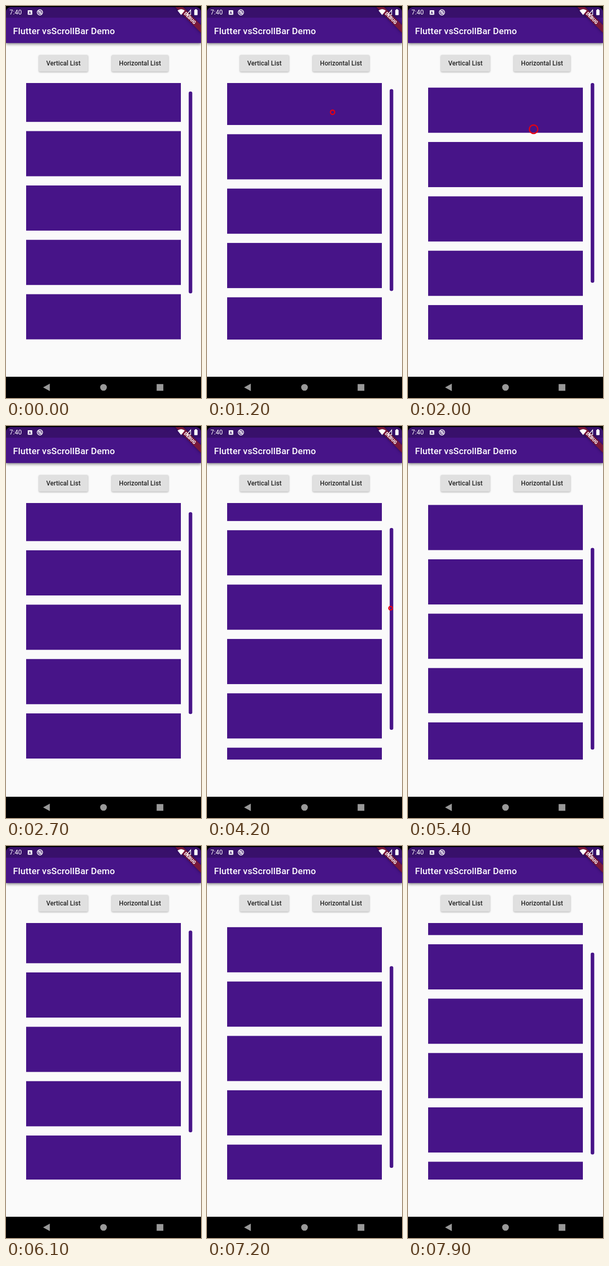
An HTML page with a canvas that plays this animation: 368 by 738 pixels, repeating every 8 s.

```html
<!DOCTYPE html>
<html lang="en">
<head>
<meta charset="utf-8">
<title>Scroll bar demo</title>
<style>
html, body { margin: 0; width: 100%; height: 100%; overflow: hidden; background: #000; }
canvas { display: block; width: 368px; height: 738px; }
</style>
</head>
<body>
<canvas id="stage"></canvas>
<script>
const W = 368, H = 738, LOOP = 8000, STEP = 100;
const PURPLE = '#471488', STATUS = '#38106b';
const LIST = { x: 38, y: 145, w: 292, h: 483, pitch: 102.35, item: 85, count: 6 };
const TRACK = LIST.h / (LIST.pitch * LIST.count);

// [time, scroll offset]; negative offsets squeeze the thumb
const SCROLL = [
  [0, 20.5], [1000, 20.5], [1700, 0], [1900, -4], [2100, -4], [2200, 0], [2500, 0],
  [2700, 22], [2900, 46], [3100, 56], [3300, 59.8], [4200, 59.8], [4700, 105],
  [5200, 118], [5300, 118], [5400, 107.4], [5500, 107.4], [6100, 18], [6400, 7.6],
  [6500, 5], [6600, 5], [6700, 80], [6800, 115], [6900, 115], [7000, 118],
  [7200, 103.2], [7600, 50.6], [7700, 50.6], [7800, 62], [7900, 71]
];
// Touch rings shrink on press and grow on release
const TOUCHES = [
  { from: 900, to: 1200, x: 237, y: 200, r0: 12, r1: 4 },
  { from: 1800, to: 2200, x: 237, y: 232, r0: 8, r1: 8 },
  { from: 2300, to: 2400, x: 237, y: 300, r0: 12, r1: 4 },
  { from: 3900, to: 4200, x: 346.5, y: 343, r0: 12, r1: 3.4 },
  { from: 4700, to: 4800, x: 346.5, y: 380, r0: 8, r1: 11 },
  { from: 7800, to: 7800, x: 346.5, y: 385, r0: 8, r1: 8 }
];

const canvas = document.getElementById('stage');
const c = canvas.getContext('2d');
const dpr = window.devicePixelRatio || 1;
canvas.width = W * dpr;
canvas.height = H * dpr;

function rect(x, y, w, h, color) {
  c.fillStyle = color;
  c.fillRect(x, y, w, h);
}

function round(x, y, w, h, r, color) {
  c.fillStyle = color;
  c.beginPath();
  c.roundRect(x, y, w, h, r);
  c.fill();
}

function poly(points, color) {
  c.fillStyle = color;
  c.beginPath();
  points.forEach(([x, y]) => c.lineTo(x, y));
  c.closePath();
  c.fill();
}

function ring(x, y, r, width, color) {
  c.strokeStyle = color;
  c.lineWidth = width;
  c.beginPath();
  c.arc(x, y, r, 0, Math.PI * 2);
  c.stroke();
}

function text(str, x, y, size, weight, color, align = 'left', spacing = 0) {
  c.font = `${weight} ${size}px Roboto, sans-serif`;
  c.letterSpacing = spacing + 'px';
  c.textAlign = align;
  c.fillStyle = color;
  c.fillText(str, x, y);
}

function withShadow(color, blur, dy, draw) {
  c.save();
  c.shadowColor = color;
  c.shadowBlur = blur * dpr;
  c.shadowOffsetY = dy * dpr;
  draw();
  c.restore();
}

function scrollAt(t) {
  const i = SCROLL.findIndex(k => k[0] > t);
  if (i < 0) return SCROLL[SCROLL.length - 1][1];
  const [t0, s0] = SCROLL[i - 1], [t1, s1] = SCROLL[i];
  return s0 + (s1 - s0) * (t - t0) / (t1 - t0);
}

function button(label, x, w) {
  withShadow('rgba(0,0,0,.3)', 3, 1, () => round(x, 92.3, w, 31.2, 2, '#e0e0e0'));
  text(label, x + w / 2, 112, 11.95, 500, '#212121', 'center', 0.08);
}

function banner() {
  c.save();
  c.beginPath();
  c.rect(300, 2, 68, 60);
  c.clip();
  c.translate(W, 2);
  c.rotate(Math.PI / 4);
  withShadow('rgba(0,0,0,.5)', 5, 0, () => rect(-35, 24, 70, 10.3, '#78183b'));
  text('DEBUG', 0, 32.2, 8.7, 900, '#fff', 'center');
  c.restore();
}

function statusIcons() {
  text('7:40', 6.5, 16.3, 12, 400, '#fff');
  round(41, 8, 8.5, 8.5, 1, '#fff');
  text('A', 45.2, 14.8, 7, 700, STATUS, 'center');
  ring(64, 12, 5, 1.4, '#fff');
  ring(64, 12, 2.3, 1.2, '#fff');
  c.beginPath();
  c.moveTo(60.5, 8.5);
  c.lineTo(67.5, 15.5);
  c.stroke();

  c.fillStyle = '#fff';
  c.beginPath();
  c.moveTo(330.5, 17);
  c.lineTo(323.7, 8.6);
  c.quadraticCurveTo(330.5, 3.6, 337.3, 8.6);
  c.fill();

  c.strokeStyle = '#fff';
  c.lineWidth = 1.2;
  c.beginPath();
  c.moveTo(348.5, 7.5);
  c.lineTo(348.5, 16.5);
  c.lineTo(341, 16.5);
  c.closePath();
  c.stroke();

  round(355.3, 7.2, 6.2, 10, 1, '#fff');
  rect(357, 6, 2.8, 2, '#fff');
}

function chrome() {
  rect(0, 0, W, H, '#000');
  rect(0, 22, W, 676, '#fafafa');
  withShadow('rgba(0,0,0,.45)', 5, 2, () => rect(0, 22, W, 47.7, PURPLE));
  round(0, 2, W, 20, [9, 9, 0, 0], STATUS);
  text('Flutter vsScrollBar Demo', 13.3, 52.7, 17.07, 500, '#fff', 'left', 0.1);
  banner();
  statusIcons();
  button('Vertical List', 62, 92.7);
  button('Horizontal List', 199.4, 107.1);

  rect(0, 698, W, 40, '#000');
  poly([[70, 718], [82.7, 711], [82.7, 725]], '#999');
  c.beginPath();
  c.arc(184, 718, 6.3, 0, Math.PI * 2);
  c.fill();
  rect(284.3, 711.8, 12.6, 12.6, '#999');
}

function list(scroll) {
  const s = Math.max(scroll, 0), squeeze = Math.min(scroll, 0);
  c.save();
  c.beginPath();
  c.rect(LIST.x, LIST.y, LIST.w, LIST.h);
  c.clip();
  const first = LIST.y + (LIST.pitch - LIST.item) / 2 - s;
  for (let i = 0; i < LIST.count; i++) {
    rect(LIST.x, first + i * LIST.pitch, LIST.w, LIST.item, PURPLE);
  }
  c.restore();
  round(344.8, LIST.y + s * TRACK, 6.7, LIST.h * TRACK + squeeze, 3, PURPLE);
}

function touches(t) {
  for (const p of TOUCHES) {
    if (t < p.from || t > p.to) continue;
    const k = p.to > p.from ? (t - p.from) / (p.to - p.from) : 0;
    ring(p.x, p.y, p.r0 + (p.r1 - p.r0) * k, 2.3, '#e60012');
  }
}

function frame(now) {
  const t = Math.floor((now - start) % LOOP / STEP) * STEP;
  c.setTransform(dpr, 0, 0, dpr, 0, 0);
  chrome();
  list(scrollAt(t));
  touches(t);
  requestAnimationFrame(() => frame(performance.now()));
}

const start = performance.now();
frame(start);
</script>
</body>
</html>
```
